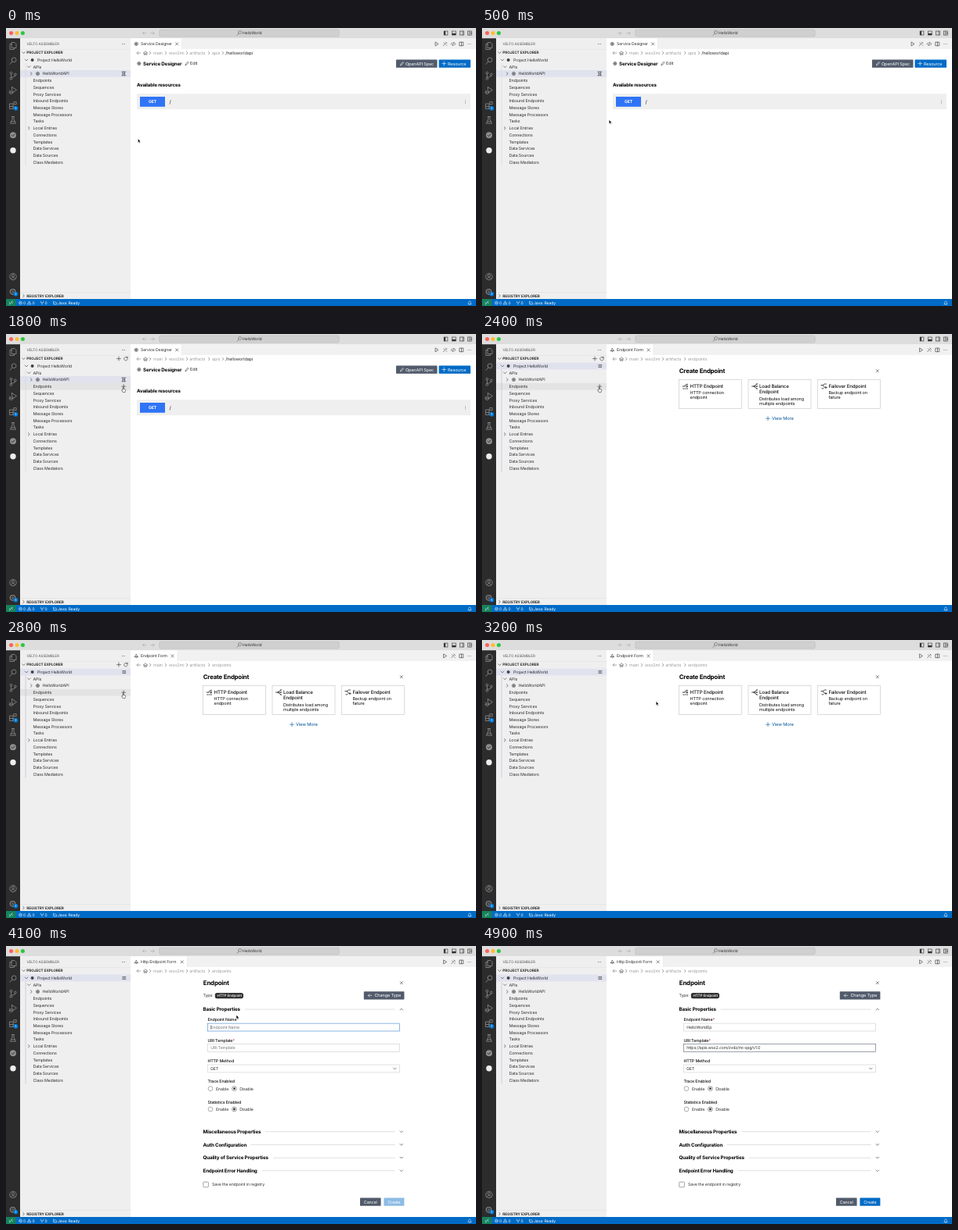
These frames come from a looping animation (600x356 px, 5000 ms). An HTML page:

```html
<!DOCTYPE html>
<html lang="en">
<head>
<meta charset="utf-8">
<title>Create an endpoint</title>
<style>
  html, body { margin: 0; width: 100%; height: 100%; overflow: hidden; background: #fff; }
  svg { display: block; width: 100vw; height: 100vh; }
  text {
    font-family: Inter, "Noto Sans", sans-serif;
    letter-spacing: -.025em;
    white-space: pre;
    text-rendering: geometricPrecision;
  }
</style>
</head>
<body>
<svg id="stage" viewBox="0 0 600 356" xmlns="http://www.w3.org/2000/svg"></svg>
<script>
const BLUE = '#006bc6', LINK = '#00559f', SLATE = '#515b6b', INK = '#303030', SOFT = '#a0a0a0';
const LOOP = 5000;
const SIDE = 18, EDITOR = 159, STATUS = 347;

// Drawing helpers: y of a text or icon is its middle
const text = (x, y, s, size = 5.3, fill = INK, weight = 400, more = '') =>
  `<text x="${x}" y="${y + size * .36}" font-size="${size}" fill="${fill}" font-weight="${weight}" ${more}>${s}</text>`;
const bold = (x, y, s, size = 6.2, fill = '#000') => text(x, y, s, size, fill, 700);
const rect = (x, y, w, h, fill, more = '') =>
  `<rect x="${x}" y="${y}" width="${w}" height="${h}" fill="${fill}" ${more}/>`;
const box = (x, y, w, h, stroke, fill = '#fff', id = '') =>
  rect(x, y, w, h, fill, `stroke="${stroke}" stroke-width=".6" ${id}`);
const line = (d, c = INK, w = .6, fill = 'none') =>
  `<path d="${d}" fill="${fill}" stroke="${c}" stroke-width="${w}" stroke-linecap="round" stroke-linejoin="round"/>`;
const icon = (x, y, d, c = INK, w = .6, fill = 'none') =>
  `<g transform="translate(${x} ${y})">${line(d, c, w, fill)}</g>`;
const dot = (x, y, r, fill, more = '') => `<circle cx="${x}" cy="${y}" r="${r}" fill="${fill}" ${more}/>`;
const ring = (x, y, r, c = INK, w = .6) => dot(x, y, r, 'none', `stroke="${c}" stroke-width="${w}"`);
const group = (id, ...parts) => `<g id="${id}">${parts.join('')}</g>`;

const RIGHT = 'M-.9-1.7L.9 0L-.9 1.7', DOWN = 'M-1.8-.9L0 .9L1.8-.9', UP = 'M-1.8 .9L0-.9L1.8 .9';
const PLUS = 'M-2.5 0H2.5M0-2.5V2.5', CROSS = 'M-1.6-1.6L1.6 1.6M1.6-1.6L-1.6 1.6';
const BACK = 'M2.3 0H-2.3M-.4-1.9L-2.3 0L-.4 1.9';
const PENCIL = 'M-2 2L-1.6 .4L1.2-2.2L2.2-1.2L-.5 1.6Z';
const PLAY = 'M-1.6-2.3L2 0L-1.6 2.3Z', WAND = 'M-2.2 2.2L1.2-1.2M1-2.4L2.4-1M-1.6-1.6L-.8-.8M1.4 1.2L2.2 2';
const SPLIT = 'M-2.3-2.3H2.3V2.3H-2.3ZM0-2.3V2.3', CODE = 'M-1.3-1.6L-2.8 0L-1.3 1.6M1.3-1.6L2.8 0L1.3 1.6M.6-2.1L-.6 2.1';
const MENU = 'M-2-1.5H2M-2 0H2M-2 1.5H2', GLASS = 'M-2.6 2.8L-.7 .7M-1-1A2 2 0 1 1 3-1A2 2 0 1 1-1-1';
const dots = (x, y, upright) => [-1.7, 0, 1.7].map(d => upright ? dot(x, y + d, .42, INK) : dot(x + d, y, .42, INK)).join('');
const apiIcon = (x, y) => ring(x, y, 2.1, '#666', .8) + dot(x, y, 1.2, '#555') + icon(x, y, 'M-2 0H2M0-2V2', '#777', .4);
const button = (x, y, w, h, fill, id = '') => rect(x, y, w, h, fill, `rx=".6" ${id}`);

function titleBar() {
  return rect(0, 0, 600, 13.2, '#dddddd') +
    [['#ff5f57', 6.6], ['#febc2e', 14], ['#28c840', 21.4]].map(([c, x]) => dot(x, 6.5, 2.5, c)).join('') +
    icon(176.8, 6.5, BACK, '#aaa') + `<g transform="rotate(180 187 6.5)">${icon(187, 6.5, BACK, '#aaa')}</g>` +
    rect(195.8, 2, 229.4, 9, '#d0d0d0', 'rx="2" stroke="#b5b5b5" stroke-width=".5"') +
    icon(297.6, 6.5, GLASS, '#555', .55) + text(302, 6.5, 'HelloWorld', 5) +
    [561.5, 571.8, 582, 592].map(x => box(x - 2.4, 4, 4.8, 5, INK, 'none')).join('') +
    rect(559.1, 4, 2, 5, INK) + rect(569.4, 6.8, 4.8, 2.2, INK) + line('M583 4V9M592 4V9M592 6.5H594.4');
}

function activityBar() {
  const c = '#8d8d8d';
  const badge = (x, y) => dot(x, y, 2.9, '#0078d4') + text(x, y, '1', 3.6, '#fff', 600, 'text-anchor="middle"');
  return rect(0, 13.2, SIDE, STATUS - 13.2, '#2c2c2c') +
    icon(9, 23, 'M-1.5-4.5H2L4-2.5V2.5H-1.5ZM-1.5-2.5H-4V4.5H1.5V2.5', c, .8) +
    icon(9, 42, 'M-4 4.4L-1.2 1.2M-1.8-1.2A2.9 2.9 0 1 1 4-1.2A2.9 2.9 0 1 1-1.8-1.2', c, .8) +
    ring(6.5, 57.6, 1.4, c, .8) + ring(6.5, 64.8, 1.4, c, .8) + ring(11.8, 59.5, 1.4, c, .8) +
    line('M6.5 59V63.4M11.8 61C11.8 63 8.8 62.4 6.8 63.2', c, .8) +
    icon(9, 80, 'M-1.5-4.5L4.5-.5L0 2.4M-1.5-4.5V-1', c, .8) + ring(6.6, 82.5, 2, c, .8) +
    line('M4 82.5H9.2M4.3 80L5 80.8M8.9 80L8.2 80.8', c, .6) +
    icon(9, 99, 'M-4-2H0V2H4V4.5H-4ZM-4 1.5H0V4.5M1.2-4.4H4.2V-1.3H1.2Z', c, .8) + badge(12.4, 102.8) +
    icon(9, 118, 'M-1.6-4.5H1.6M-1-4.5V-1L-3.5 4.2H3.5L1-1V-4.5M-2.3 1.8H2.3', c, .8) +
    dot(9, 137.3, 4, c) + icon(9, 137.3, 'M-1.8 0L-.4 1.4L2-1.3', '#2c2c2c', .9) +
    dot(9, 156.7, 3.7, '#eee') +
    ring(9, 318.4, 4.2, c, .8) + ring(9, 317.2, 1.6, c, .8) + line('M6.2 321.4C6.8 319 11.2 319 11.8 321.4', c, .8) +
    ring(8.6, 337.8, 3.3, c, 1.1) + ring(8.6, 337.8, 1.2, c, .8) + badge(12.4, 340.6);
}

const ROWS = ['Project HelloWorld', 'APIs', 'HelloWorldAPI', 'Endpoints', 'Sequences', 'Proxy Services',
  'Inbound Endpoints', 'Message Stores', 'Message Processors', 'Tasks', 'Local Entries', 'Connections',
  'Templates', 'Data Services', 'Data Sources', 'Class Mediators'];
const PITCH = 8.73, rowY = i => 41 + i * PITCH;

function sidebar() {
  const indent = [40, 34.5, 46.5], w = EDITOR - SIDE;
  return rect(SIDE, 13.2, w, STATUS - 13.2, '#efefef') +
    text(26.5, 20.5, 'VELTO ASSEMBLER', 4.6, '#555') + dots(150, 20.5) +
    rect(SIDE, 27, w, .4, '#d8d8d8') +
    icon(22.5, 31.6, DOWN) + bold(26.3, 31.6, 'PROJECT EXPLORER', 4.75, INK) +
    group('tools', icon(144, 31.6, PLUS), icon(153, 31.6, 'M1.6-1.6A2.3 2.3 0 1 0 2.3 .2M2.2-2.5V-1H.7')) +
    rect(SIDE, 0, w, PITCH, '#e0e2ee', 'id="chosen"') +
    rect(SIDE, 0, w, PITCH, '#e3e3e3', 'id="hover"') +
    rect(24.8, 45.4, .5, 131, '#c8c8c8', 'id="guide"') +
    icon(26, rowY(0), DOWN) + dot(33.6, rowY(0), 2, '#444') +
    icon(29.3, rowY(1), DOWN) + icon(32.3, rowY(2), RIGHT) + apiIcon(40.5, rowY(2)) + icon(29.3, rowY(10), RIGHT) +
    ROWS.map((s, i) => text(indent[i] || 34.5, rowY(i), s)).join('') +
    group('apiTool', icon(150.3, rowY(2), 'M-2.4-2.3H2.4M-2.4 2.3H2.4M-1.2-2.3V0H1.2V2.3M1.2-2.3V0M-1.2 0V2.3')) +
    group('projectTool', icon(150.8, rowY(0), MENU)) +
    group('add', icon(150.2, 0, PLUS)) +
    rect(SIDE, 338.2, w, .4, '#d8d8d8') +
    icon(22.5, 343, RIGHT) + bold(26.3, 343, 'REGISTRY EXPLORER', 4.75, INK);
}

function statusBar() {
  const w = '#fff', y = 352, h = 356 - STATUS;
  return rect(0, STATUS, 600, h, BLUE) + rect(0, STATUS, 12.5, h, '#16825d') +
    icon(6.2, y, 'M-2-.4L-.3 .8L-2 2M2-2L.3-.8L2 .4', w, .6) +
    ring(18.5, y, 2, w, .5) + icon(18.5, y, 'M-.8-.8L.8 .8M.8-.8L-.8 .8', w, .5) + text(22, y, '0', 5, w) +
    icon(29.8, y, 'M0-2L2.2 1.8H-2.2ZM0-.6V.6', w, .5) + text(33.6, y, '0', 5, w) +
    icon(46, y, 'M0 2.2V0M-1.7-2V-.6Q0 .8 1.7-.6V-2', w, .5) + text(49.5, y, '0', 5, w) +
    icon(62.5, y, 'M-2-2V1.4H0M-2-1H1.6L2.4 1.8H-.5', w, .5) + text(66, y, 'Java: Ready', 5.1, w) +
    icon(592, y, 'M-2 1.2L-1.4 .4V-.6A1.4 1.4 0 0 1 1.4-.6V.4L2 1.2ZM-.5 2H.5', w, .5);
}

function tab(name, end, mark) {
  return rect(EDITOR, 13.2, 441, 13.6, '#f1f1f1') + rect(EDITOR, 13.2, end - EDITOR, 13.6, '#fff') +
    rect(end, 13.2, .4, 13.6, '#e2e2e2') + mark + text(172, 20.4, name, 5.2) + icon(end - 6.3, 20.4, CROSS) +
    dots(591.5, 20.4) + icon(581.5, 20.4, SPLIT);
}

const chevron = x => icon(x, 32, RIGHT, '#666', .6);
function crumbs(last) {
  return icon(169.4, 32, BACK, '#777') + icon(178, 32, 'M-2.6 0L0-2.4L2.6 0M-1.8-.6V2.3H-.6V.5H.6V2.3H1.8V-.6', '#555') +
    [184.2, 204, 231.2, 259.3].map(chevron).join('') +
    text(188, 32, 'main', 5.5, SOFT) + text(208, 32, 'wso2mi', 5.5, SOFT) + text(234.3, 32, 'artifacts', 5.5, SOFT) +
    text(263, 32, last, 5.5, SOFT);
}

function designer() {
  return tab('Service Designer', 224.4, apiIcon(166.3, 20.4)) +
    icon(550, 20.4, PLAY) + icon(560.5, 20.4, WAND) + icon(571, 20.4, CODE) +
    crumbs('apis') + chevron(277) + text(280.3, 32, '/helloworldapi', 5.5) +
    apiIcon(169.8, 45.5) + bold(175, 45.5, 'Service Designer') + icon(231, 45.5, PENCIL) + text(235, 45.5, 'Edit', 5.5) +
    button(498, 40.5, 52.5, 10.3, SLATE) + icon(505.6, 45.6, PENCIL, '#fff') + text(510, 45.6, 'OpenAPI Spec', 5.5, '#fff') +
    button(552.6, 40.5, 40.4, 10.3, BLUE) + icon(559.2, 45.6, PLUS, '#fff') + text(564, 45.6, 'Resource', 5.5, '#fff') +
    bold(167, 72.5, 'Available resources', 6.1) +
    rect(167, 84.2, 426, 20, '#efefef') + rect(171, 88, 32, 12.8, '#2f74f6') +
    text(187, 94.5, 'GET', 5.2, '#fff', 700, 'text-anchor="middle"') + text(208.4, 94.5, '/', 6.2, '#111') + dots(586.5, 94.5, true);
}

const formMark = icon(166.3, 20.4, 'M-2.3 1.2H2.3M-1.7 1.2L0-2.2L1.7 1.2M0 1.2V2.4');
const formTools = () => icon(560.5, 20.4, PLAY) + icon(571, 20.4, WAND);

function card(x, title, desc, mark, id = '') {
  const top = title.length > 1 ? 82.6 : 75.2;
  const face = (bg, ink) => box(x, 58.3, 80, 37.2, '#c4c4c4', bg) +
    icon(x + 8, 67, mark, ink, .75) +
    title.map((s, i) => text(x + 14, 66.6 + i * 7.2, s, 6.15, ink, 500)).join('') +
    desc.map((s, i) => text(x + 14, top + i * 6.2, s, 5.5, ink)).join('');
  return face('#fff', '#111') + (id && group(id, face(BLUE, '#fff')));
}

function chooser() {
  const fan = 'M-3.5 0H-1L3-3M-1 0L3 3M-1 0H3M3-3.5V-2.5M3-.5V.5M3 2.5V3.5';
  return tab('Endpoint Form', 218.8, formMark) + formTools() + crumbs('endpoints') +
    bold(251.8, 47.3, 'Create Endpoint', 7.8) + icon(504.8, 47.2, CROSS) +
    card(251.6, ['HTTP Endpoint'], ['HTTP connection', 'endpoint'],
      'M-3.5 0H-1.2M-1.2 0L1-2.6H3M3 0H.4M1.6-1.2L3 0L1.6 1.2M-3 3H-1.8M-.6 3H.6M1.8 3H3', 'picked') +
    card(340, ['Load Balance', 'Endpoint'], ['Distributes load among', 'multiple endpoints'], fan) +
    card(428.4, ['Failover Endpoint'], ['Backup endpoint on', 'failure'], 'M-3.5-1.5H-1L1-3H3M-1-1.5L1 1.5H3.5M2.3 .3L3.5 1.5L2.3 2.7M-2.5 2.8H-.5') +
    icon(365, 108.2, PLUS, LINK) + text(370, 108.2, 'View More', 5.75, LINK);
}

function section(y, name, from, open) {
  return bold(251.5, y, name, 6.25) + rect(from, y - .2, 496.5 - from, .5, '#c0c0c0') + icon(504.8, y, open ? UP : DOWN);
}

function radios(y) {
  return ring(261, y, 2.9, '#777') + text(268, y, 'Enable') +
    ring(291.4, y, 2.9, '#555') + dot(291.4, y, 1.4, '#333') + text(298.2, y, 'Disable');
}

function form() {
  const must = '<tspan fill="#d33">*</tspan>';
  const label = (y, s) => text(257.4, y, s, 5.3, '#111', 500);
  return tab('Http Endpoint Form', 231, formMark) + formTools() + crumbs('endpoints') +
    bold(251.8, 47.3, 'Endpoint', 7.9) + icon(504.8, 47.2, CROSS) +
    text(251.5, 63.5, 'Type:', 5.2) + rect(266.8, 60, 36.2, 7.2, INK, 'rx="2.6"') + text(269.4, 63.6, 'HTTP Endpoint', 4.6, '#fff', 500) +
    button(456.8, 58.2, 51.6, 10.4, SLATE) + icon(464.6, 63.4, BACK, '#fff') + text(470.4, 63.4, 'Change Type', 5.6, '#fff') +
    section(81, 'Basic Properties', 304.5, true) +
    label(94.4, 'Endpoint Name' + must) + box(257.5, 99.1, 244.8, 9.9, '#ccc', '#fff', 'id="nameBox"') +
    text(261.3, 104.1, '', 5.3, INK, 400, 'id="name"') +
    label(120.9, 'URI Template' + must) + box(257.5, 125.6, 244.8, 9.9, '#ccc', '#fff', 'id="uriBox"') +
    text(261.3, 130.6, '', 5.2, INK, 400, 'id="uri"') +
    rect(261, 101.5, .4, 5.4, '#222', 'id="caret"') +
    label(147.2, 'HTTP Method') + box(257.5, 152, 244.8, 9.9, '#ccc') + text(261, 157, 'GET') + icon(496.3, 157, DOWN) +
    label(173.5, 'Trace Enabled') + radios(182.6) +
    label(199.8, 'Statistics Enabled') + radios(209) +
    section(237.8, 'Miscellaneous Properties', 331) + section(254.4, 'Auth Configuration', 312.5) +
    section(271.1, 'Quality of Service Properties', 341) + section(287.8, 'Endpoint Error Handling', 327) +
    rect(251.8, 302.2, 6.6, 6.6, '#fff', 'rx=".8" stroke="#666" stroke-width=".6"') + text(263, 305.5, 'Save the endpoint in registry', 5.24) +
    button(452, 322.4, 26.6, 10.4, SLATE) + text(465.3, 327.7, 'Cancel', 5.4, '#fff', 400, 'text-anchor="middle"') +
    button(482.4, 322.4, 26, 10.4, BLUE, 'id="create"') + text(495.4, 327.7, 'Create', 5.4, '#fff', 400, 'text-anchor="middle"');
}

const stage = document.getElementById('stage');
stage.innerHTML = rect(0, 0, 600, 356, '#fff') + titleBar() + activityBar() + sidebar() +
  group('designer', designer()) + group('chooser', chooser()) + group('form', form()) + statusBar() +
  group('arrow', line('M0 0V4.9L1.2 3.8L2 5.6L2.9 5.2L2.1 3.5H3.6Z', '#fff', .5, '#000')) +
  group('hand', line('M0 0C-.6 0-.7 .5-.6 1V3L-1.5 2.6C-2 2.6-2 3.1-1.7 3.5L-.4 5.6H2.4L3 3.6V2.4C3 1.7 2.2 1.8 2.1 2C2 1.4 1.3 1.5 1.2 1.8C1.1 1.4 .6 1.4 .5 1.7V.7C.5 .2 .3 0 0 0Z', '#111', .5, '#fff'));

const el = Object.fromEntries([...stage.querySelectorAll('[id]')].map(e => [e.id, e]));
const show = (id, on) => { el[id].style.display = on ? '' : 'none'; };
const set = (id, key, v) => el[id].setAttribute(key, v);
const clamp = v => Math.max(0, Math.min(1, v));

// Pointer stops: time, x, y
const PATH = [[0, 168.4, 142], [250, 168.4, 142], [900, 149.6, 69], [2900, 149.6, 69], [3500, 294, 88.5], [LOOP, 294, 88.5]];
function pointer(t) {
  const i = Math.max(1, PATH.findIndex(p => p[0] > t));
  const [a, x0, y0] = PATH[i - 1], [b, x1, y1] = PATH[i];
  const k = clamp((t - a) / (b - a)), e = k * k * (3 - 2 * k);
  return [x0 + (x1 - x0) * e, y0 + (y1 - y0) * e];
}

const NAME = 'HelloWorldEp', URI = 'https://apis.wso2.com/zvdz/mi-qsg/v1.0';
const OPEN = 2200, FORM = 3900, URI_AT = 4600;

function field(id, value, hint) {
  el[id].textContent = value || hint;
  set(id, 'fill', value ? INK : '#777');
}

function render(t) {
  const [x, y] = pointer(t);
  const inTree = x > SIDE && x < EDITOR;
  const row = Math.round((y - rowY(0)) / PITCH);
  const onRow = inTree && row >= 0 && row < ROWS.length;
  const onCard = t > 2900 && x > 251.6 && y > 58.2;
  const visible = t < 3500 || (t >= FORM && t < 4300);
  const hand = onRow || (onCard && t < FORM);
  const chosen = t < OPEN ? 2 : 0;

  show('designer', t < OPEN);
  show('chooser', t >= OPEN && t < FORM);
  show('form', t >= FORM);
  show('picked', onCard);
  show('tools', inTree);
  show('hover', onRow && row !== chosen);
  show('add', onRow && row > 2);
  set('hover', 'y', rowY(row) - PITCH / 2);
  set('add', 'transform', `translate(0 ${rowY(row)})`);
  set('chosen', 'y', rowY(chosen) - PITCH / 2);
  set('guide', 'fill', chosen ? '#d0d0d0' : '#c3a5cf');
  show('apiTool', chosen === 2);
  show('projectTool', chosen === 0);

  show('arrow', visible && !hand);
  show('hand', visible && hand);
  for (const id of ['arrow', 'hand']) set(id, 'transform', `translate(${x} ${y})`);

  const name = NAME.slice(0, Math.round(clamp((t - 4150) / 350) * NAME.length));
  const done = t >= URI_AT + 100;
  field('name', name, 'Endpoint Name');
  field('uri', done ? URI : '', 'URI Template');
  set('nameBox', 'stroke', t < URI_AT ? '#3f84cf' : '#ccc');
  set('uriBox', 'stroke', t < URI_AT ? '#ccc' : '#59636f');
  show('caret', t >= FORM && t < 4150);
  set('create', 'opacity', done ? 1 : .45);
}

const start = performance.now();
function tick(now) {
  render(Math.max(0, now - start) % LOOP);
  requestAnimationFrame(tick);
}
render(0);
requestAnimationFrame(tick);
</script>
</body>
</html>
```
